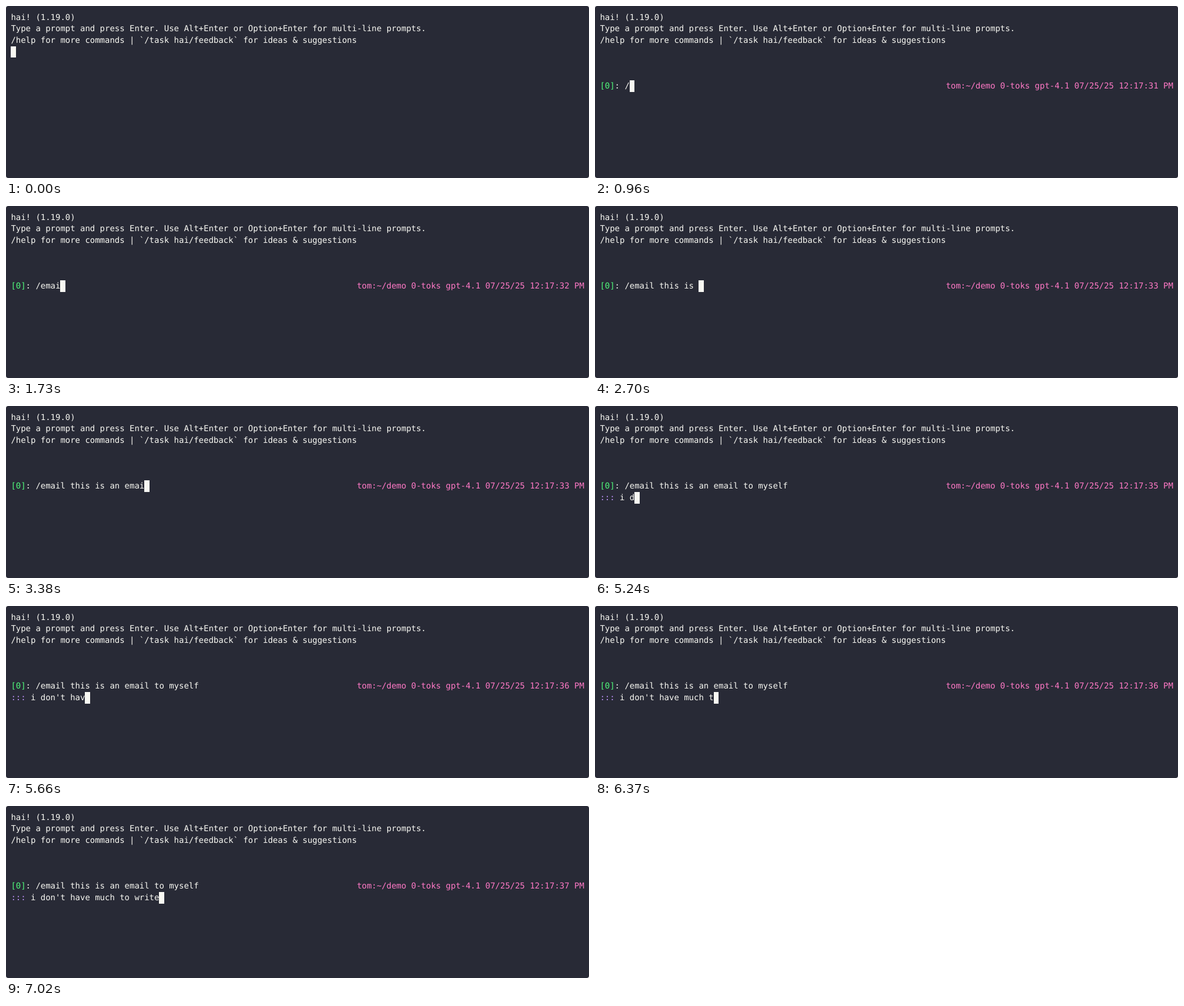
An HTML page for the animation above (8 s loop, 991 by 294 pixels).

```html
<!DOCTYPE html>
<html lang="en">
<head>
<meta charset="utf-8">
<title>Terminal session</title>
<style>
  html, body { margin: 0; width: 100%; height: 100%; overflow: hidden; background: #fff; }
  svg { display: block; }
  text {
    font: 14px "DejaVu Sans Mono", monospace;
    font-variant-ligatures: none;
    white-space: pre;
    text-rendering: geometricPrecision;
    fill: #f8f8f2;
  }
  .green { fill: #50fa7b; }
  .pink { fill: #ff79c6; }
  .purple { fill: #bd93f9; }
  #cursor { fill: #f8f8f2; shape-rendering: crispEdges; }
</style>
</head>
<body>
<svg id="stage" width="991" height="294" viewBox="0 0 991 294">
  <rect width="991" height="294" rx="4" fill="#282a36"/>
  <rect id="cursor" width="8.4" height="19.6"/>
</svg>
<script>
const LOOP = 8000;
const CELL = 8.4, LINE = 19.6, COLS = 116;
const PROMPT_AT = 30;      // ms until the prompt shows
const CLOCK_OFFSET = 380;  // ms into the first clock second
const INPUT = "/email this is an email to myself\ni don't have much to write";

// Bursts of typing: first key, last key, number of keys
const BURSTS = [
  [960, 960, 1], [1260, 1350, 2], [1530, 1530, 1], [1730, 1730, 1],
  [1770, 2410, 8], [2560, 2560, 1], [2700, 2700, 1], [2870, 2870, 1],
  [3010, 3710, 11], [3890, 3990, 3], [4080, 4300, 3], [4730, 4730, 1],
  [5100, 5240, 3], [5290, 5660, 8], [5740, 5780, 2], [6000, 6730, 11],
  [6910, 7020, 2]
];
const keys = BURSTS.flatMap(([from, to, n]) =>
  Array.from({ length: n }, (_, i) =>
    Math.round((from + (to - from) * i / Math.max(1, n - 1)) / 10) * 10));

const stage = document.getElementById("stage");
const cursor = document.getElementById("cursor");
const colX = col => +(CELL * (col + 1)).toFixed(2);
const rowY = row => +(LINE * (row + 0.5)).toFixed(2);

// A run of text on the character grid
function addText(row, col, str = "", cls = "") {
  const el = document.createElementNS("http://www.w3.org/2000/svg", "text");
  el.setAttribute("y", rowY(row) + 14);
  el.setAttribute("class", cls);
  stage.append(el);
  const set = s => {
    if (s === el.textContent) return;
    el.setAttribute("x", [...s].map((_, i) => colX(col + i)).join(" "));
    el.textContent = s;
  };
  set(str);
  return set;
}

addText(0, 0, "hai! (1.19.0)");
addText(1, 0, "Type a prompt and press Enter. Use Alt+Enter or Option+Enter for multi-line prompts.");
addText(2, 0, "/help for more commands | `/task hai/feedback` for ideas & suggestions");

const setIndex = addText(6, 0, "", "green");
const setColon = addText(6, 3);
const setFirst = addText(6, 5);
const setStatus = addText(6, COLS - 46, "", "pink");
const setMore = addText(7, 0, "", "purple");
const setSecond = addText(7, 4);

function moveCursor(row, col) {
  cursor.setAttribute("x", colX(col));
  cursor.setAttribute("y", rowY(row));
}

function render(t) {
  const ready = t >= PROMPT_AT;
  const typed = keys.filter(k => k <= t).length;
  const [first, second] = INPUT.slice(0, typed).split("\n");
  const multi = second !== undefined;

  // The clock only refreshes when a key is pressed
  const lastKey = typed ? keys[typed - 1] : 0;
  const sec = 30 + Math.floor((lastKey + CLOCK_OFFSET) / 1000);

  setIndex(ready ? "[0]" : "");
  setColon(ready ? ":" : "");
  setStatus(ready ? `tom:~/demo 0-toks gpt-4.1 07/25/25 12:17:${sec} PM` : "");
  setFirst(first);
  setMore(multi ? ":::" : "");
  setSecond(second || "");

  if (!ready) moveCursor(3, 0);
  else if (multi) moveCursor(7, 4 + second.length);
  else moveCursor(6, 5 + first.length);
}

const start = performance.now();
function tick() {
  render((performance.now() - start) % LOOP);
  requestAnimationFrame(tick);
}
render(0);
requestAnimationFrame(tick);
</script>
</body>
</html>
```
